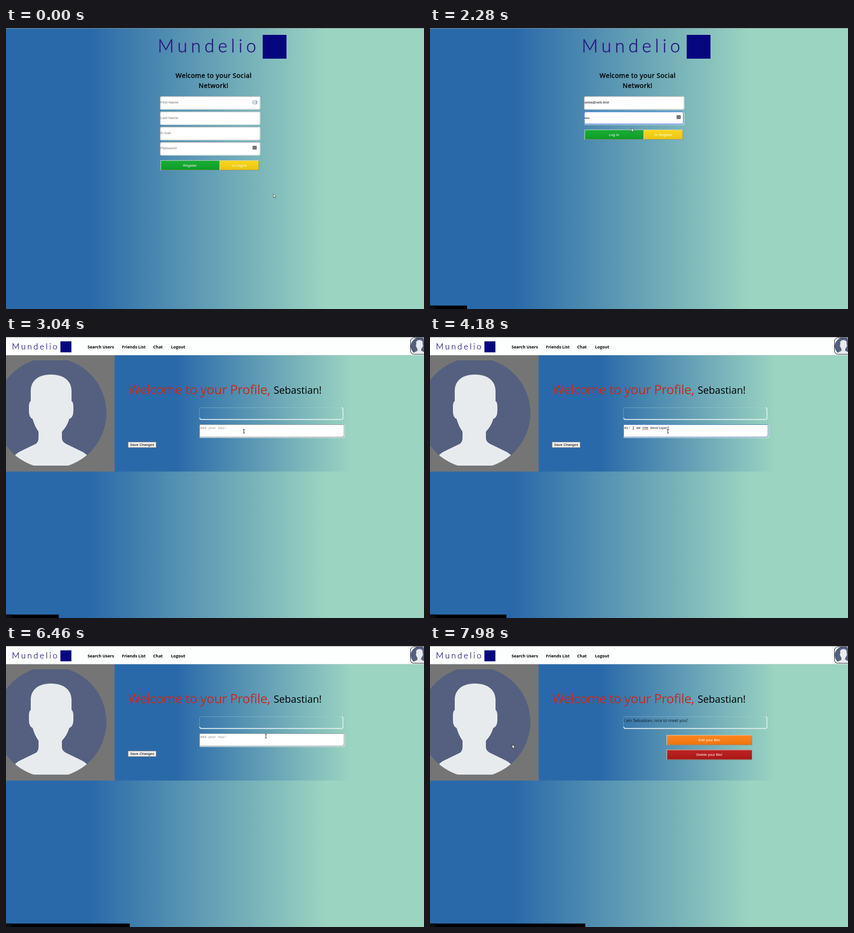
Recreate the animation shown at these times as an HTML page. Size 912 by 614 pixels, loop 8 s.

```html
<!DOCTYPE html>
<html lang="en">
<head>
<meta charset="utf-8">
<title>Social network demo</title>
<style>
  html, body { margin: 0; width: 100%; height: 100%; overflow: hidden; background: #2a69a9; }
  svg { display: block; width: 912px; height: 614px; }
  text { font-family: "Liberation Sans", Arial, sans-serif; font-size: 8px; white-space: pre; }
  .head { font: 400 14.2px "Noto Sans", sans-serif; letter-spacing: .5px; stroke: #000; stroke-width: .45px; }
  .logo { font-family: Lato, sans-serif; font-weight: 300; fill: #2b1f85; stroke: #2b1f85; }
  .nav { font: 700 9px "Open Sans", sans-serif; }
  .bio { font: 9.1px "Open Sans", sans-serif; fill: #0c1622; }
  .title { font: 28px "Open Sans", sans-serif; letter-spacing: -.41px; fill: #c72a1c; }
  .user { font: 22px "Open Sans", sans-serif; letter-spacing: -.1px; }
  .mono { font: 7.25px "Liberation Mono", monospace; }
  .pop { font: 7px Roboto, sans-serif; }
  .mid { text-anchor: middle; }
</style>
</head>
<body>
<svg id="stage" viewBox="0 0 912 614">
  <defs>
    <linearGradient id="sea"><stop offset=".2" stop-color="#2a69a9"/><stop offset=".765" stop-color="#9bd4c1"/></linearGradient>
    <linearGradient id="shade" x2="0" y2="1"><stop offset="0" stop-color="#fff" stop-opacity=".06"/><stop offset="1" stop-opacity=".08"/></linearGradient>
    <clipPath id="round"><circle cx="98" cy="166" r="121"/></clipPath>
    <clipPath id="cut"><path d="M-30 51H230V281H-30Z"/></clipPath>
    <g id="avatar" clip-path="url(#cut)"><g clip-path="url(#round)">
      <path fill="#556080" d="M-30 40H230V290H-30Z"/>
      <path fill="#e8ebee" d="M98 82C126 82 143 96 143 118V140Q147 142 147 152V162Q147 176 138 179Q134 194 122 207V221Q122 228 130 233L163 249Q172 253 176 258V290H20V258Q24 253 33 249L66 233Q71 228 71 221V207Q62 194 58 179Q50 176 50 162V152Q50 142 54 140V118C54 96 70 82 98 82Z"/>
    </g></g>
    <path id="arrow" d="M.4.4V8.6L2.3 7L3.6 9.8L5 9.1L3.8 6.4L6.4 6.2Z" fill="#fff" stroke="#222" stroke-width=".7"/>
    <path id="beam" d="M-2-4H-.4L0-3.6L.4-4H2M0-3.6V3.6M-2 4H-.4L0 3.6L.4 4H2" fill="none" stroke="#111" stroke-width="1"/>
  </defs>
  <g id="scene"></g>
</svg>
<script>
const LOOP = 8000, STEP = 380;
const MAIL = 'seba@seb.test', USER = 'Sebastian', BRAND = 'Mundelio';
const HELLO = 'Hi! I am the developer of this website!';
const MEET = `I am ${USER}, nice to meet you!`;
const MISSPELT = ['I', 'the', 'developer', 'this', 'website', 'meet', 'you'];

// One entry per step: view, its data, and the pointer [shape, x, y]
const STEPS = [
  ['register', {}, ['arrow', 583, 362]],
  ['register', {}, ['arrow', 512, 283]],
  ['login', {}, ['beam', 441, 163]],
  ['login', { mail: 4, focus: 0 }],
  ['login', { mail: 13, focus: 1 }],
  ['login', { mail: 13, pass: 2, focus: 1 }],
  ['login', { mail: 13, pass: 4, focus: 1 }, ['arrow', 439, 218]],
  ['empty', { popup: true }, ['arrow', 439, 225]],
  ['edit', {}, ['beam', 519, 206]],
  ...[3, 12, 22, 32, 38, 39].map(n => ['edit', { text: HELLO.slice(0, n), focus: true }, ['beam', 519, 206]]),
  ['bio', { text: HELLO }, ['arrow', 615, 238]],
  ['empty', {}, ['arrow', 566, 197]],
  ['edit', {}, ['beam', 567, 197]],
  ['edit', { text: MEET.slice(0, 10), focus: true }, ['beam', 567, 197]],
  ['edit', { text: MEET, focus: true }, ['beam', 567, 197]],
  ['edit', { text: MEET, pressed: true }, ['arrow', 297, 234]],
  ['bio', { text: MEET }, ['arrow', 179, 215]]
];

const rect = (x, y, w, h, fill, more = '') =>
  `<rect x="${x}" y="${y}" width="${w}" height="${h}" fill="${fill}" ${more}/>`;
const line = (d, color, width = 1, more = '') =>
  `<path d="${d}" fill="none" stroke="${color}" stroke-width="${width}" ${more}/>`;
const text = (x, y, s, cls = '', fill = '#000') =>
  `<text x="${x}" y="${y}" class="${cls}" style="fill:${fill}">${s}</text>`;

function button(x, y, w, color, label) {
  const h = 22, r = x + w, b = y + h;
  return rect(x, y, w, h, color) + rect(x, y, w, h, 'url(#shade)')
    + line(`M${x + .6} ${b}V${y + .5}H${r}`, '#cdd6d2', 1.1)
    + line(`M${r - .5} ${y + 1}V${b - .5}H${x + 1}`, '#8d8d80')
    + text(x + w / 2, y + 13.8, label, 'mid', '#fff');
}

function field(row, value, hint, icon, focused) {
  const y = 149 + row * 33.4;
  let out = rect(336, y, 219, 29.6, '#dfe4e3', 'rx="4"')
    + rect(336.7, y + .7, 216, 26.8, '#fff', `rx="3" ${focused ? 'stroke="#4f88e0" stroke-width="1.6"' : ''}`);
  if (!focused) out += line(`M336.6 ${y + 26}V${y + 4}Q336.6 ${y + .8} 340 ${y + .8}H551`, '#9a9f9f', .9);
  out += text(337, y + 16.2, value || hint, '', value ? '#111' : '#757575');
  if (icon === 'card') out += rect(538.5, y + 10, 9, 7, '#fff', 'stroke="#6c88a0" rx="1"')
    + line(`M540 ${y + 13.5}h3M544 ${y + 12}h3m-3 2.5h3`, '#6c88a0', 1.2);
  if (icon === 'key') out += rect(538, y + 8.3, 9, 8, '#666', 'rx="1"')
    + line(`M539.5 ${y + 12.5}h6.5`, '#ddd', 1.2, 'stroke-dasharray="1.2 1.2"');
  if (focused && !value) out += line(`M338 ${y + 9}v9`, '#222', .7);
  return out;
}

function logo(x, base, size) {
  const k = size / 39;
  return `<text x="${x}" y="${base}" class="logo" style="font-size:${size}px;letter-spacing:${8 * k}px;stroke-width:${.8 * k}">${BRAND}</text>`
    + rect(x + 229 * k, base - 38 * k, 52 * k, 52 * k, '#06067e');
}

function welcome(body) {
  return rect(0, 0, 912, 614, 'url(#sea)') + rect(0, 0, 912, 1, '#8b8f90') + logo(331, 53, 39)
    + text(453, 109, 'Welcome to your Social', 'head mid') + text(453, 131, 'Network!', 'head mid') + body;
}

function popup() {
  const arrow = (x, y) => `<path d="M${x - 2.5} ${y - 1.2}h5l-2.5 2.8z" fill="#333"/>`;
  return rect(540, -2, 193, 138, '#274a5c', 'opacity=".35" rx="2"') + rect(541, -2, 191, 136, '#fff')
    + rect(541, 91, 191, 43, '#f6f8f8') + line('M541 91.5H732', '#dfe2e2')
    + text(550, -1.5, '¿Guardar contraseña?', 'pop', '#333')
    + text(550, 18, 'Nombre de usuario', 'pop', '#333') + text(550, 44.5, 'Contraseña', 'pop', '#333')
    + rect(622.5, 6.5, 100, 19, '#fff', 'stroke="#dcdcdc"') + text(626, 18.3, MAIL, 'pop', '#333') + arrow(715.5, 16)
    + line('M622 33.5H697M622 51.5H697', '#cfcfcf') + text(626, 45, '••••', '', '#222') + arrow(690.5, 42.5)
    + line('M711 42Q715.5 36.5 720 42Q715.5 47.5 711 42Z', '#333', 1.1) + '<circle cx="715.5" cy="42" r="1.5" fill="#333"/>'
    + rect(627.5, 62, 45, 19, '#4285f4', 'rx="1.5"') + text(650, 74, 'Guardar', 'pop mid', '#fff')
    + rect(677.5, 62.5, 45, 18, '#fff', 'stroke="#e3e6e8"') + text(700, 74, 'Nunca', 'pop mid', '#4285f4')
    + text(550, 109, 'Las contraseñas se guardan en tu cuenta de Norvia', 'pop', '#6b6f73')
    + text(550, 121, 'para que puedas utilizarlas en cualquier dispositivo.', 'pop', '#6b6f73');
}

function editor({ text: typed = '', focus, pressed }) {
  const unit = 7.25 * .6;
  let out = rect(422, 191.5, 317.5, 29, '#dde5e5', 'rx="3"')
    + rect(422.5, 191.5, 315, 27, '#fff', `rx="2" stroke="${focus ? '#4979c4' : '#8e9699'}" stroke-width="1"`)
    + line('M734 218L737 215M736 218L737 217', '#888', .6)
    + text(424, 200.7, typed || 'Add your bio!', 'mono', typed ? '#111' : '#858585');
  for (const m of typed.matchAll(/\w+(?=[ !])/g)) {
    if (MISSPELT.includes(m[0])) out += line(`M${424 + m.index * unit} 202.4h${m[0].length * unit}`, '#e02020', 1, 'stroke-dasharray="1.5 .7"');
  }
  if (focus) out += line(`M${424.4 + typed.length * unit} 194.5v7.5`, '#222', .7);
  return out + rect(266.5, 229.5, 61, 12, pressed ? '#dcdcdc' : '#efefef', `stroke="${pressed ? '#3c3c3c' : '#8a8a8a'}"`)
    + text(297, 238.2, 'Save Changes', 'mid');
}

function profile(body, data, bio = '') {
  const menu = [[178, 'Search Users'], [253, 'Friends List'], [321, 'Chat'], [360, 'Logout']];
  return rect(0, 0, 912, 614, 'url(#sea)') + rect(0, 0, 912, 40, '#fdfefe')
    + rect(0, 0, 912, 1, '#929292') + rect(0, 39, 912, 1, '#d5dfe3')
    + logo(13, 27, 18) + menu.map(([x, s]) => text(x, 24.5, s, 'nav')).join('')
    + '<use href="#avatar" transform="translate(886.6 -6) scale(.157)"/>'
    + rect(882.5, 1.7, 40, 36, 'none', 'rx="8" stroke="#1d2130" stroke-width="1.1"')
    + rect(237, 40, 675, 254, 'url(#sea)') + rect(0, 40, 237, 254, '#757575') + '<use href="#avatar"/>'
    + '<text x="267" y="124.5" class="title">Welcome to your Profile,</text>' + text(584, 124.3, USER + '!', 'user')
    + line('M422 177V158Q422 154.5 426 154.5H731', '#a9d0d8', .8, 'opacity=".6"')
    + line('M422.5 177Q423 180.3 427 180.3H731Q735.2 180.3 735.2 176V158Q735.2 155 732 154.5', '#e4eef0', 1.9)
    + `<text x="422.5" y="165.5" class="bio">${bio}</text>` + body + (data.popup ? popup() : '');
}

const GREEN = '#0ca828', YELLOW = '#fad410';
const VIEWS = {
  register: () => welcome(field(0, '', 'First Name', 'card') + field(1, '', 'Last Name') + field(2, '', 'E-mail')
    + field(3, '', 'Password', 'key') + button(337, 289, 129, GREEN, 'Register') + button(466, 289, 86, YELLOW, 'or Log In')),
  login: ({ mail = 0, pass = 0, focus }) => welcome(field(0, MAIL.slice(0, mail), 'E-mail', '', focus === 0)
    + field(1, '•'.repeat(pass), 'Password', 'key', focus === 1)
    + button(337, 222, 129, GREEN, 'Log In') + button(466, 222, 86, YELLOW, 'or Register')),
  empty: data => profile(button(454, 186, 186, GREEN, 'Add your Bio!'), data),
  edit: data => profile(editor(data), data),
  bio: data => profile(button(516, 194.5, 187, '#ff7d10', 'Edit your Bio!')
    + button(516, 226.5, 187, '#b81616', 'Delete your Bio!'), data, data.text)
};

const scene = document.getElementById('scene');
let shown = -1;

function draw(step) {
  const [view, data, pointer] = STEPS[step];
  let out = VIEWS[view](data);
  if (step > 1) {
    out += rect(0, 606.5, 12 + 17.2 * (step - 2), 7.5, '#000') + rect(0, 606.5, 12, 7.5, '#081014');
  }
  if (pointer) out += `<use href="#${pointer[0]}" x="${pointer[1]}" y="${pointer[2]}"/>`;
  scene.innerHTML = out;
}

function tick() {
  const step = Math.floor(performance.now() % LOOP / STEP);
  if (step !== shown) draw(shown = step);
  requestAnimationFrame(tick);
}
tick();
</script>
</body>
</html>
```
